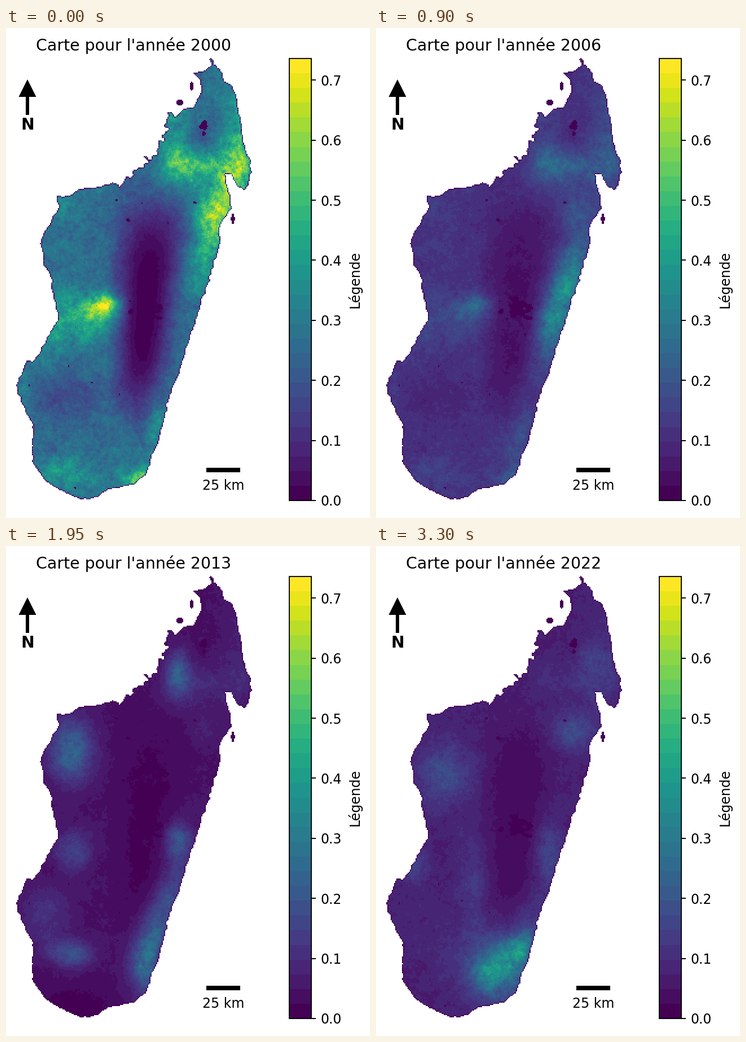
A matplotlib script for the animation above (3.45 s loop, 645x868 px).

```python
import numpy as np
import matplotlib.pyplot as plt
from matplotlib.animation import FuncAnimation
from matplotlib.patches import Polygon, Rectangle
from matplotlib.path import Path

W, H = 645, 868
CELL = 2
LEFT, RIGHT, TOP, BOTTOM = 16, 438, 51, 839
VMAX, LEVELS = 0.736, 30
FIRST_YEAR, YEARS = 2000, 23
PT = 1.706  # type and line scale at 100 dpi

# Key points of the coast, clockwise from the northern tip
COAST = [
    (360, 55), (367, 54), (369, 64), (380, 71), (386, 94), (399, 100), (409, 130),
    (416, 160), (420, 200), (434, 240), (435, 250), (428, 277), (421, 286), (411, 281),
    (399, 259), (388, 260), (392, 286), (399, 304), (398, 322), (378, 350), (380, 380),
    (364, 434), (336, 518), (306, 612), (289, 658), (271, 730), (247, 792), (230, 807),
    (184, 817), (152, 834), (133, 835), (88, 815), (66, 798), (47, 768), (46, 730),
    (50, 712), (40, 690), (22, 648), (19, 632), (35, 591), (50, 590), (76, 545),
    (93, 515), (87, 485), (80, 460), (82, 446), (68, 420), (61, 374), (92, 320),
    (90, 297), (114, 296), (130, 284), (160, 284), (192, 272), (202, 282), (210, 265),
    (240, 243), (255, 232), (272, 212), (283, 184), (287, 147), (303, 157), (316, 143),
    (334, 140), (346, 110), (342, 92), (333, 80), (352, 74), (364, 66)]

rng = np.random.default_rng(7)
xs, ys = np.meshgrid(np.arange(LEFT, RIGHT, CELL) + CELL / 2,
                     np.arange(TOP, BOTTOM, CELL) + CELL / 2)


def soft_noise(sigma):
    """Unit-variance noise blurred by sigma cells."""
    fy = np.fft.fftfreq(xs.shape[0])[:, None]
    fx = np.fft.fftfreq(xs.shape[1])[None, :]
    blur = np.exp(-2 * (np.pi * sigma) ** 2 * (fx ** 2 + fy ** 2))
    noise = np.fft.ifft2(np.fft.fft2(rng.standard_normal(xs.shape)) * blur).real
    return noise / noise.std()


def blob(x, y, sx, sy):
    return np.exp(-((xs - x) / sx) ** 2 / 2 - ((ys - y) / sy) ** 2 / 2)


def pulse(year, peak, span):
    return np.exp(-((year - peak) / span) ** 2 / 2)


# Land mask: the north-western shore is the most ragged
ragged = 0.8 + 3 * blob(250, 215, 40, 45)
warped = np.column_stack([(xs + ragged * soft_noise(1.5)).ravel(),
                          (ys + ragged * soft_noise(1.5)).ravel()])
land = Path(COAST).contains_points(warped).reshape(xs.shape)
islets = ((blob(308, 132, 6, 6) > 0.6) | (blob(329, 103, 3, 8) > 0.6)
          | (blob(402, 338, 6, 12) * blob(402, 338, 3, 9) > 0.5))
land |= islets
interior = land.copy()
for axis in (0, 1):
    for step in (-1, 1):
        interior &= np.roll(land, step, axis)

# Fine grain shared by all years, dark shoreline and lakes
texture = 1 + 0.045 * soft_noise(0.3) + 0.06 * soft_noise(1.2) + 0.05 * soft_noise(4)
texture[~interior] *= rng.uniform(0, 0.6, (~interior).sum())
lakes = blob(257, 496, 22, 20) + 0.8 * blob(353, 176, 7, 10)
texture[(lakes + 0.22 * soft_noise(1.5) > 0.72) | islets] = 0

# Permanent parts of the landscape
forest = (0.27 * blob(312, 248, 28, 26) + 0.20 * blob(395, 245, 38, 26)
          + 0.15 * blob(408, 180, 18, 50) + 0.12 * blob(350, 320, 22, 24))
early = (0.42 * blob(183, 493, 20, 14) + 0.18 * blob(130, 512, 42, 32)
         + 0.13 * blob(295, 165, 24, 32) + 0.28 * blob(236, 798, 20, 14)
         + 0.14 * blob(100, 790, 38, 18) + 0.10 * blob(72, 575, 16, 24)
         + 0.08 * blob(265, 710, 14, 35) + 0.07 * blob(95, 310, 20, 25)
         + 0.07 * blob(32, 640, 10, 25)
         - 0.09 * blob(110, 652, 55, 34) - 0.08 * blob(345, 200, 25, 24))
south_west = 0.24 * blob(72, 652, 30, 36) + 0.20 * blob(105, 717, 28, 16)
mid_decade = (0.12 * blob(305, 225, 14, 30) + 0.11 * blob(120, 540, 20, 25)
              + 0.10 * blob(120, 725, 25, 16) - 0.03 * blob(130, 815, 80, 30))
recent = (0.22 * blob(203, 757, 27, 27) + 0.22 * blob(247, 715, 20, 20)
          + 0.08 * blob(220, 725, 60, 50) + 0.10 * blob(122, 405, 35, 38)
          + 0.09 * blob(345, 328, 30, 25) + 0.07 * blob(390, 215, 24, 40)
          + 0.09 * blob(305, 545, 20, 40) + 0.10 * blob(70, 570, 14, 18)
          + 0.05 * blob(175, 590, 20, 45))

# Long central plateau that leans with the east coast
across = np.abs(xs - 255 + 0.08 * (ys - 400)) / (58 - 0.08 * (ys - 420))
plateau = np.exp(-across ** 2.5 - ((ys - 490) / 190) ** 4)
shore = 362 - 0.321 * (ys - 380)


def year_map(year):
    t = year - FIRST_YEAR
    fast, slow = np.exp(-(t / 5.5) ** 2), np.exp(-t / 9)
    late = pulse(year, 2022.5, 2.5)

    # Green belt sliding south along the east coast
    belt = np.exp(-((xs - shore) / 22) ** 2 / 2
                  - ((ys - min(330 + 25 * t, 720)) / 75) ** 2 / 2)

    values = 0.045 + 0.225 * fast + 0.03 * late + fast * early + slow * forest
    values += 0.28 * np.exp(-(t / 18) ** 2) * belt + late * recent
    values += 0.16 * pulse(year, 2011.5, 4) * blob(248, 735, 16, 42)
    values += 0.16 * pulse(year, 2012, 4) * blob(302, 520, 17, 22)
    values += 0.20 * pulse(year, 2013.5, 3) * blob(116, 362, 27, 38)
    values += pulse(year, 2016.5, 2.2) * south_west + pulse(year, 2013, 2) * mid_decade
    values *= 1 - (0.57 + 0.40 * np.exp(-(t / 4) ** 2)) * plateau
    return np.ma.masked_where(~land, np.clip(values * texture, 0, VMAX))


plt.rcParams.update({"font.family": "DejaVu Sans", "axes.linewidth": 0.8 * PT * 0.98})
fig = plt.figure(figsize=(W / 100, H / 100), dpi=100, facecolor="white")
ax = fig.add_axes([0, 0, 1, 1])
image = ax.imshow(year_map(FIRST_YEAR), cmap=plt.get_cmap("viridis", LEVELS),
                  vmin=0, vmax=VMAX, extent=(LEFT, RIGHT, BOTTOM, TOP),
                  interpolation="nearest")


def label(x, y, text, size=10, **style):
    return ax.text(x, y, text, fontsize=size * PT, ha="center", va="baseline", **style)


title = label(226.3, 39.6, "", size=12)

# North arrow and scale bar
ax.add_patch(Polygon([(38, 91), (53.5, 122), (41, 122), (41, 154), (35, 154),
                      (35, 122), (22.5, 122)], fc="black", lw=0))
label(38, 179.5, "N", size=12, weight="bold")
ax.add_patch(Rectangle((355, 779), 60, 8, fc="black", lw=0))
label(385, 818.5, "25 km")
ax.set(xlim=(0, W), ylim=(H, 0), aspect="auto")
ax.axis("off")

cax = fig.add_axes([502 / W, 1 - 837 / H, 39 / W, 783 / H])
bar = fig.colorbar(image, cax=cax, ticks=np.arange(8) / 10, format="%.1f")
cax.tick_params(length=3.5 * PT, pad=3.5 * PT, width=0.8 * PT, labelsize=10 * PT)
bar.set_label("Légende", size=10 * PT, labelpad=4 * PT)


def update(frame):
    year = FIRST_YEAR + frame
    image.set_data(year_map(year))
    title.set_text(f"Carte pour l'année {year}")
    return image, title


anim = FuncAnimation(fig, update, frames=YEARS, interval=150, repeat=True, repeat_delay=0)
plt.show()
```
